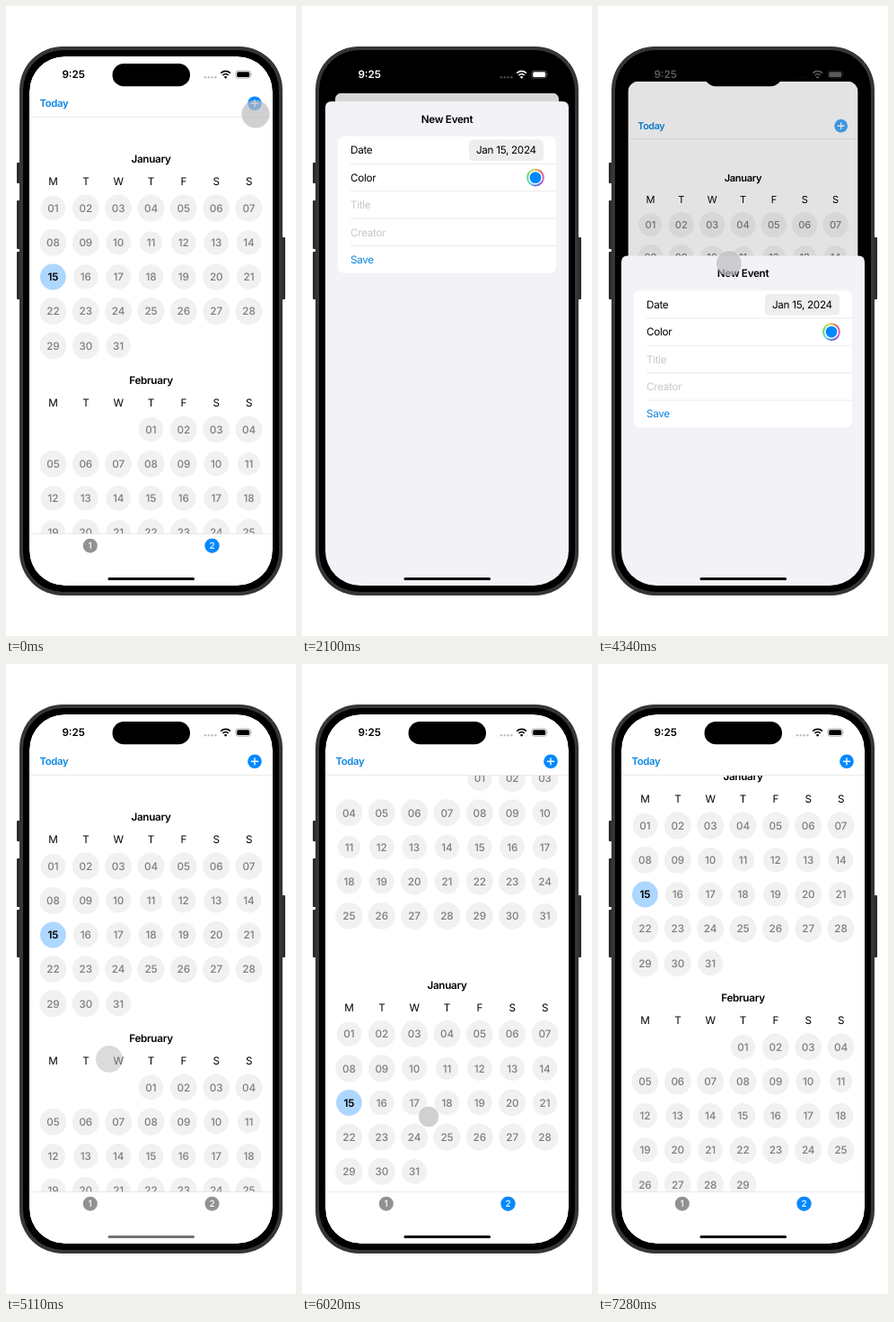
Write an HTML page that moves like this. It is 323x700 px and loops after 7.74 s.

```html
<!DOCTYPE html>
<html lang="en">
<head>
<meta charset="utf-8">
<title>Calendar and new event sheet</title>
<style>
html, body { margin: 0; width: 100%; height: 100%; overflow: hidden; background: #fff; }
svg { display: block; width: 323px; height: 700px; }
text { font: 400 11.7px Inter, "Open Sans", sans-serif; letter-spacing: -.3px; text-rendering: geometricPrecision; }
.mid { text-anchor: middle; }
.bold { font-weight: 600; }
.day { font-weight: 500; fill: #7d7d7d; letter-spacing: -.1px; }
.badge { font-size: 10px; font-weight: 500; fill: #fff; letter-spacing: 0; }
.hint { fill: #c8c8cb; }
.link { fill: #0a86e0; }
.line { stroke: #e2e2e4; stroke-width: .7; }
</style>
</head>
<body>
<svg viewBox="0 0 323 700" xmlns="http://www.w3.org/2000/svg">
  <defs>
    <clipPath id="screenClip"><rect x="26" y="56" width="271" height="588" rx="39"/></clipPath>
    <clipPath id="cardClip"><rect id="cardShape" x="26" y="56" width="271" height="588"/></clipPath>
    <clipPath id="listClip"><rect x="26" y="124" width="271" height="462.5"/></clipPath>
  </defs>

  <g fill="#2b2b2d">
    <rect x="12" y="174" width="5" height="23" rx="1"/>
    <rect x="12" y="216" width="5" height="54" rx="1"/>
    <rect x="12" y="273" width="5" height="53" rx="1"/>
    <rect x="306" y="257" width="5" height="69" rx="1"/>
  </g>
  <rect x="15" y="45" width="293" height="610" rx="48" fill="#353638"/>
  <rect x="19" y="49" width="285" height="602" rx="44.5" fill="#000"/>

  <g clip-path="url(#screenClip)">
    <g id="card" clip-path="url(#cardClip)">
      <rect x="26" y="56" width="271" height="588" fill="#fff"/>
      <g clip-path="url(#listClip)"><g id="months"></g></g>
      <path class="line" d="M26 123.5H297M26 586.5H297"/>
      <text class="bold link" x="37.5" y="112.4" style="font-size:11.4px;letter-spacing:-.4px">Today</text>
      <g id="plus">
        <circle cx="277" cy="108.3" r="7.8" fill="#08f"/>
        <path d="M273.4 108.3h7.2M277 104.7v7.2" stroke="#fff" stroke-width="1.4" stroke-linecap="round"/>
      </g>
      <circle cx="93.8" cy="599.7" r="8" fill="#929292"/>
      <text class="mid badge" x="93.6" y="603.3">1</text>
      <circle cx="229.5" cy="599.7" r="8" fill="#929292"/>
      <circle id="tab" cx="229.5" cy="599.7" r="8" fill="#08f"/>
      <text class="mid badge" x="229.5" y="603.3">2</text>
      <rect id="dim" x="26" y="56" width="271" height="588"/>
    </g>

    <g id="sheet">
      <path d="M26 650V7Q26 0 33 0H290Q297 0 297 7V650Z" fill="#f2f2f7"/>
      <text class="mid bold" x="161.5" y="23.6">New Event</text>
      <rect x="40" y="38.7" width="243" height="152.3" rx="7" fill="#fff"/>
      <g id="rows"></g>
      <rect x="186" y="42.5" width="83" height="23.5" rx="4.5" fill="#eeeeef"/>
      <text class="mid" x="227.4" y="58.4">Jan 15, 2024</text>
      <g id="well" fill="none" stroke-width="2"></g>
      <circle cx="260" cy="84.6" r="6.4" fill="#08f"/>
    </g>
  </g>

  <rect x="118.5" y="64" width="86.5" height="25.3" rx="12.6"/>
  <g id="status">
    <text class="mid bold" x="75.2" y="80.3" style="letter-spacing:0">9:25</text>
    <g id="signal"></g>
    <path d="M239.3 74.6a7.5 7.5 0 0 1 10.6 0M241.5 77a4.4 4.4 0 0 1 6.2 0" fill="none" stroke="currentColor" stroke-width="1.7"/>
    <path d="M244.6 80.8l-1.8-1.9a2.6 2.6 0 0 1 3.6 0z"/>
    <rect x="256" y="72" width="16.4" height="8.2" rx="2.5" fill="none" stroke="currentColor" stroke-opacity=".4" stroke-width=".8"/>
    <rect x="257.2" y="73.2" width="14" height="5.8" rx="1.5"/>
    <path d="M273.3 74.8q1.2 1.3 0 2.7z" opacity=".5"/>
  </g>
  <rect id="home" x="113.5" y="635" width="96.5" height="3" rx="1.5"/>
  <circle id="touch" fill="#bcbcc0"/>
</svg>
<script>
const LOOP = 7740;
const REST = 103.5, HIDDEN = 644;
const $ = id => document.getElementById(id);

function add(parent, tag, attrs, text) {
  const el = document.createElementNS("http://www.w3.org/2000/svg", tag);
  for (const k in attrs) el.setAttribute(k, attrs[k]);
  if (text) el.textContent = text;
  parent.appendChild(el);
  return el;
}
const set = (id, attrs) => { for (const k in attrs) $(id).setAttribute(k, attrs[k]); };
const clamp = v => Math.max(0, Math.min(1, v));
const mix = (a, b, u) => a + (b - a) * u;
const smooth = u => u * u * (3 - 2 * u);
const easeOut = u => 1 - (1 - u) ** 2;
const ramp = (t, from, to, ease = smooth) => ease(clamp((t - from) / (to - from)));
// Rises over a..b, falls over c..d
const pulse = (t, a, b, c, d) => ramp(t, a, b) - ramp(t, c, d);
const grey = v => `rgb(${v},${v},${v})`;

function month(name, top, first, days, today) {
  const g = $("months");
  const colX = c => 52.4 + c * 36.35;
  add(g, "text", { class: "mid bold", x: 161.5, y: top + 4.2 }, name);
  [..."MTWTFSS"].forEach((d, c) =>
    add(g, "text", { class: "mid", x: colX(c), y: top + 29.2 }, d));
  for (let d = 1; d <= days; d++) {
    const cell = first + d - 1;
    const x = colX(cell % 7), y = top + 54.6 + Math.floor(cell / 7) * 38.2;
    const label = String(d).padStart(2, "0");
    const ones = label.split("1").length - 1;
    const now = d === today;
    add(g, "circle", { cx: x, cy: y, r: now ? 14.4 : 15 - 1.2 * ones, fill: now ? "#aed7ff" : "#f1f1f1" });
    const el = add(g, "text", { class: "mid day", x, y: y + 4.2 }, label);
    if (now) el.style.cssText = "fill:#000;font-weight:600";
  }
}
month("December", -114, 4, 31);
month("January", 170, 0, 31, 15);
month("February", 415.9, 3, 29);

["Date", "Color", "Title", "Creator", "Save"].forEach((label, i) => {
  const y = 54.2 + i * 30.4;
  add($("rows"), "text", { class: i === 4 ? "link" : i > 1 ? "hint" : "", x: 54, y: y + 4.2 }, label);
  if (i) add($("rows"), "path", { class: "line", d: `M54 ${y - 15.2}H283` });
});

// Hue ring of the colour well
const ringAt = a => `${260 + 8.8 * Math.sin(a)} ${84.6 - 8.8 * Math.cos(a)}`;
for (let i = 0; i < 36; i++) {
  const a = i * Math.PI / 18;
  add($("well"), "path", {
    d: `M${ringAt(a)}A8.8 8.8 0 0 1 ${ringAt(a + .19)}`,
    stroke: `hsl(${(400 - i * 10) % 360},62%,60%)`
  });
}
for (let i = 0; i < 4; i++)
  add($("signal"), "circle", { cx: 222 + i * 3.8, cy: 79.2, r: 1.2 });

const dragAt = t => ramp(t, 3960, 4690);
const scrollAt = t => 186.5 * ramp(t, 5540, 6020) - 231.5 * ramp(t, 6100, 7070);

// Opens, settles, is dragged down, then falls away
function sheetTop(t) {
  return HIDDEN - 538 * ramp(t, 1006, 1610, easeOut) - 2.5 * ramp(t, 2380, 2660)
    + 326.5 * dragAt(t) + 214 * ramp(t, 4690, 5040, easeOut);
}

function touchAt(t) {
  if (t < 3000) // tap on the plus button
    return { x: 278, y: 120 - 8 * ramp(t, 0, 420), r: 15.5, on: 1 - ramp(t, 600, 860) };
  if (t < 5350) { // sheet drag
    const near = ramp(t, 3430, 3900), drag = dragAt(t);
    return {
      x: 189 - 8 * near - 66 * drag,
      y: 130 - 18 * near + 327 * drag,
      r: 15 - 2.4 * (near - drag),
      on: pulse(t, 3430, 3600, 5040, 5270)
    };
  }
  const scroll = scrollAt(t); // finger moves with the list
  return { x: 128 + .07 * scroll, y: 316.5 + scroll, r: 11.2, on: pulse(t, 5440, 5560, 6640, 6820) };
}

function draw(t) {
  const top = sheetTop(t);
  const p = clamp((HIDDEN - top) / (HIDDEN - REST));
  const lit = clamp(p * 2 - 1);
  const ink = grey(255 * lit);

  set("card", { transform: `translate(161.5 ${56 + 41 * p}) scale(${1 - .081 * p}) translate(-161.5 -56)` });
  set("cardShape", { rx: mix(39, 7.5, clamp(p * 1.25)) });
  set("dim", { opacity: .16 * p });
  set("plus", { opacity: 1 - .4 * p });
  set("tab", { opacity: 1 - pulse(t, 950, 1150, 5120, 5350) });
  set("months", { transform: `translate(0 ${scrollAt(t)})` });
  set("sheet", { transform: `translate(0 ${top})`, visibility: p > 0 ? "visible" : "hidden" });
  set("status", { fill: ink, color: ink });
  set("signal", { fill: grey(p > .1 ? 75 * lit ** 2 : 190) });
  set("home", { fill: grey(115 * pulse(t, 4900, 5080, 5140, 5330)) });

  const { x, y, r, on } = touchAt(t);
  set("touch", { cx: x, cy: y, r, opacity: .7 * on });
}

function tick(now) {
  draw(now % LOOP);
  requestAnimationFrame(tick);
}
draw(0);
requestAnimationFrame(tick);
</script>
</body>
</html>
```
